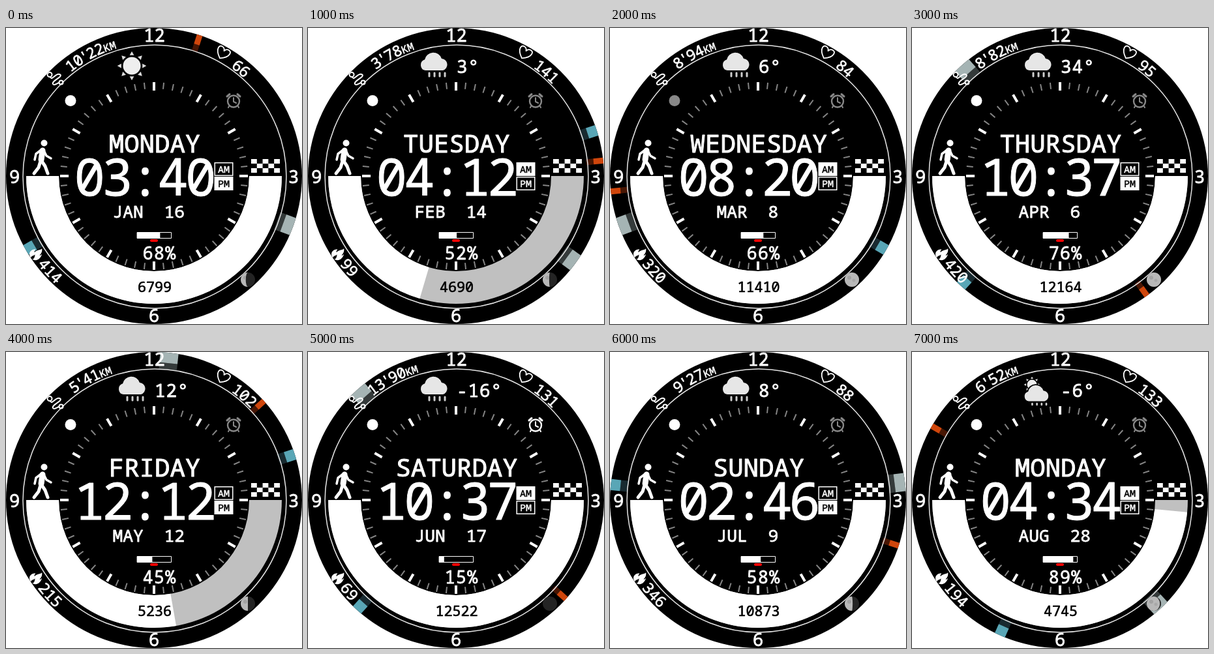
An HTML page with a canvas for the animation above (8 s loop, 454 px wide and 454 px high).

```html
<!DOCTYPE html>
<html lang="en">
<head>
<meta charset="utf-8">
<title>Watch face</title>
<style>
html, body { margin: 0; width: 100%; height: 100%; overflow: hidden; background: #fff; }
canvas { display: block; }
</style>
</head>
<body>
<canvas id="face" width="454" height="454"></canvas>
<script>
const ctx = document.getElementById('face').getContext('2d');
const C = 227, TAU = Math.PI * 2, rad = deg => deg * Math.PI / 180;

// arc: clock angle where the white progress band ends (90 = complete); moon: lit fraction
const states = [
  { day: 'MONDAY', time: '03:40', sec: 3, pm: 1, date: 'JAN  16', power: 68, steps: 6799, km: "10'22", bpm: 66, kcal: 414, temp: '', sky: 'sun', link: 1, moon: .35, arc: 90 },
  { day: 'TUESDAY', time: '04:12', sec: 14, date: 'FEB  14', power: 52, steps: 4690, km: "3'78", bpm: 141, kcal: 99, temp: '3°', sky: 'rain', link: 1, moon: .45, arc: 196.5 },
  { day: 'WEDNESDAY', time: '08:20', sec: 44, date: 'MAR  8', power: 66, steps: 11410, km: "8'94", bpm: 84, kcal: 320, temp: '6°', sky: 'rain', link: 0, moon: 1, arc: 90 },
  { day: 'THURSDAY', time: '10:37', sec: 24, pm: 1, date: 'APR  6', power: 76, steps: 12164, km: "8'82", bpm: 95, kcal: 420, temp: '34°', sky: 'rain', link: 1, moon: 1, arc: 90 },
  { day: 'FRIDAY', time: '12:12', sec: 8, pm: 1, date: 'MAY  12', power: 45, steps: 5236, km: "5'41", bpm: 102, kcal: 215, temp: '12°', sky: 'rain', link: 1, moon: .5, arc: 170 },
  { day: 'SATURDAY', time: '10:37', sec: 22, date: 'JUN  17', power: 15, steps: 12522, km: "13'90", bpm: 131, kcal: 69, temp: '-16°', sky: 'rain', link: 1, alarm: 1, moon: 0, arc: 90 },
  { day: 'SUNDAY', time: '02:46', sec: 18, pm: 1, date: 'JUL  9', power: 58, steps: 10873, km: "9'27", bpm: 88, kcal: 346, temp: '8°', sky: 'rain', link: 1, moon: .55, arc: 90 },
  { day: 'MONDAY', time: '04:34', sec: 50, date: 'AUG  28', power: 89, steps: 4745, km: "6'52", bpm: 133, kcal: 194, temp: '-6°', sky: 'mixed', link: 1, moon: .92, arc: 95.5 },
];

const paths = {
  heart: new Path2D('M0 9C-6 5 -10 1 -10 -4C-10 -10 -2 -10 0 -4C2 -10 10 -10 10 -4C10 1 6 5 0 9Z'),
  flame: new Path2D('M-1 10C-10 9 -10 0 -5 -4C-5 -1 -4 0 -3 0C-3 -6 1 -8 1 -12C6 -8 5 -5 6 -2C7 -3 7 -5 7 -6C11 1 9 9 2 10C4 7 2 5 0 2C0 6 -3 6 -1 10Z'),
  route: new Path2D('M68 75C70 82 76 69 82 71C90 74 69 81 72 86C74 89 78 85 81 84'),
  cloud: new Path2D('M180 65A8.5 8.5 0 0 1 179 48.5A13.5 13.5 0 0 1 205 47A9.2 9.2 0 0 1 207 65Z'),
};

function fill(color, path) { ctx.fillStyle = color; path ? ctx.fill(path) : ctx.fill(); }
function stroke(color, width, path) {
  ctx.strokeStyle = color; ctx.lineWidth = width;
  path ? ctx.stroke(path) : ctx.stroke();
}
function disc(x, y, r, color) { ctx.beginPath(); ctx.arc(x, y, r, 0, TAU); fill(color); }
function ring(x, y, r, color, width) { ctx.beginPath(); ctx.arc(x, y, r, 0, TAU); stroke(color, width); }
function rect(x, y, w, h, color) { ctx.fillStyle = color; ctx.fillRect(x, y, w, h); }
function line(color, width, ...points) {
  ctx.beginPath();
  for (let i = 0; i < points.length; i += 2) ctx.lineTo(points[i], points[i + 1]);
  stroke(color, width);
}
function at(x, y, deg, paint) {
  ctx.save(); ctx.translate(x, y); ctx.rotate(rad(deg)); paint(); ctx.restore();
}
// A thin outline gives the letters a medium weight with rounded ends.
function text(str, x, y, size, { color = '#fff', align = 'center', gap = 0 } = {}) {
  ctx.font = `${size}px "Noto Sans Mono", monospace`;
  ctx.letterSpacing = gap + 'px';
  ctx.textAlign = align;
  ctx.fillStyle = ctx.strokeStyle = color;
  ctx.lineWidth = Math.min(size * .03, 1);
  const left = x + (align === 'center' ? gap / 2 : 0);
  ctx.fillText(str, left, y);
  ctx.strokeText(str, left, y);
}

const advance = (ch, size) => size * (ch === "'" ? .4 : .6);
// Text on a circle; inward letters have their tops towards the centre. Returns the end angle.
function arcText(str, angle, size, inward) {
  const mid = inward ? 216 : 212, r = inward ? 224 : -204, dir = inward ? -1 : 1;
  for (const ch of String(str)) {
    const half = dir * advance(ch, size) / 2 / mid * 360 / TAU;
    at(C, C, angle + half + (inward ? 180 : 0), () => text(ch, 0, r, size));
    angle += 2 * half;
  }
  return angle;
}

function marker(angle, width, edge, bright, dark) {
  at(C, C, angle, () => {
    rect(-width / 2, -edge, width, edge - 201, dark);
    rect(-width / 2, -229, width, 229 - edge, bright);
  });
}

function drawBand(arc) {
  const band = (from, to, color) => {
    ctx.beginPath();
    ctx.arc(C, C, 196, rad(from - 90), rad(to - 90));
    ctx.arc(C, C, 146, rad(to - 90), rad(from - 90), true);
    fill(color);
  };
  band(90, 270, '#c0c0c0');
  band(arc, 270, '#fff');
  for (let i = 0; i < 60; i++) at(C, C, i * 6, () =>
    i % 5 ? line('#858585', 2, 0, -134, 0, -144) : line('#fff', 4, 0, -131, 0, -144));
}

function sun(x, y, r, rays) {
  disc(x, y, r, '#eee');
  for (let i = 0; i < rays; i++) at(x, y, i * 360 / rays, () => {
    ctx.beginPath();
    ctx.moveTo(-r * .25, -r * 1.2); ctx.lineTo(r * .25, -r * 1.2); ctx.lineTo(0, -r * 1.65);
    fill('#ddd');
  });
}

function drawWeather(sky) {
  if (sky === 'sun') return sun(193, 58, 13.5, 8);
  const mixed = sky === 'mixed';
  if (mixed) sun(184, 50, 7.5, 8);
  ctx.save();
  if (mixed) {
    ctx.translate(17, 17);
    ctx.scale(.9, .9);
    stroke('#000', 4, paths.cloud);
  }
  fill('#e6e6e6', paths.cloud);
  for (let x = 186; x < 212; x += 8) line('#ccc', 3, x, 69, x, mixed ? 71 : 74);
  ctx.restore();
}

function drawAlarm(color) {
  ring(349, 112.5, 9, color, 2.4);
  line(color, 2, 349, 107, 349, 113, 353, 115);
  line(color, 3, 339, 105, 343, 101.5);
  line(color, 3, 359, 105, 355, 101.5);
  line(color, 2, 342, 120, 341, 122);
  line(color, 2, 356, 120, 357, 122);
}

function drawWalker() {
  disc(58.5, 176.5, 5, '#fff');
  line('#fff', 9, 56, 188, 54, 202);
  line('#fff', 3.5, 54, 187, 46, 193, 44, 202);
  line('#fff', 3.5, 58, 188, 62, 196, 69, 200);
  line('#fff', 5, 54, 203, 60, 212, 64, 223);
  line('#fff', 5, 53, 204, 50, 214, 43, 223);
}

function drawFlag() {
  for (let row = 0; row < 3; row++)
    for (let col = row % 2; col < 5; col += 2) rect(376 + col * 8.8, 201 + row * 7, 8.8, 7, '#fff');
}

function drawMoon(lit) {
  const x = 371, y = 386, r = 11;
  disc(x, y, r, '#242424');
  if (!lit) return;
  ctx.beginPath();
  ctx.arc(x, y, r, TAU / 4, TAU * 3 / 4);
  ctx.ellipse(x, y, Math.abs(2 * lit - 1) * r, r, 0, -TAU / 4, TAU / 4, lit < .5);
  fill('#b8b8b8');
  ctx.save();
  ctx.clip();
  disc(x - 4, y - 3, 3, '#a2a2a2');
  disc(x + 3, y + 1, 2.5, '#a8a8a8');
  ctx.restore();
}

function drawRim(s) {
  stroke('#fff', 2, paths.route);
  ring(67, 71.5, 3.5, '#fff', 2);
  ring(84.5, 83.5, 3, '#fff', 2);
  const width = [...s.km].reduce((sum, ch) => sum + advance(ch, 23), 2 * advance('K', 16));
  const end = arcText(s.km, -27.6 - width / 2 / 212 * 360 / TAU, 23);
  arcText('KM', end, 16);
  at(332.5, 38.5, 30, () => stroke('#fff', 1.8, paths.heart));
  arcText(s.bpm, 35.3, 23);
  at(46, 346, 45, () => fill('#fff', paths.flame));
  arcText(s.kcal, 233, 23, true);
  drawMoon(s.moon);
  text('12', C + .5, 21, 27);
  text('3', 441, 238, 27);
  text('6', C, 451, 27);
  text('9', 13, 238, 27);
}

function halfDay(label, y, on) {
  rect(319.5, y, 29, 21, '#fff');
  if (!on) rect(321, y + 1.5, 26, 18, '#000');
  text(label, 334, y + 15.5, 15, { color: on ? '#000' : '#fff' });
}

function drawCentre(s) {
  text(s.day, 228, 191, 39);
  text(s.time, 213.5, 256.5, 79, { gap: -4.8 });
  halfDay('AM', 206, !s.pm);
  halfDay('PM', 228, s.pm);
  text(s.date, 163.5, 291, 26.3, { align: 'left' });
  ctx.strokeStyle = '#fff';
  ctx.lineWidth = 1;
  ctx.strokeRect(201.5, 313.5, 52, 9);
  rect(201, 313, 52 * s.power / 100, 10, '#fff');
  line('#f00', 4, 223, 326, 231, 326);
  text(s.power + '%', 235, 355, 26.5, { gap: 1.4 });
  text(s.steps, 228, 405, 21.7, { color: '#000' });
}

function draw(s) {
  ctx.clearRect(0, 0, 454, 454);
  ctx.save();
  ctx.lineCap = 'butt';
  disc(C, C, C, '#000');
  ctx.clip();
  const [h, m] = s.time.split(':').map(Number);
  marker(h % 12 * 30 + m / 2, 28, 211, '#a5b4b4', '#343a3a');
  marker(m * 6, 17, 212, '#59a6b6', '#182a30');
  marker(s.sec * 6, 9, 212, '#cf460c', '#481603');
  ring(228, 228, 202, '#e4e4e4', 1.5);
  drawBand(s.arc);
  ctx.lineCap = ctx.lineJoin = 'round';
  drawRim(s);
  drawWeather(s.sky);
  text(s.temp, 228, 69, 27.5, { align: 'left', gap: 1 });
  disc(99, 111.5, 8.5, s.link ? '#fff' : '#888');
  drawAlarm(s.alarm ? '#fff' : '#888');
  drawWalker();
  drawFlag();
  drawCentre(s);
  ctx.restore();
}

function tick() {
  draw(states[Math.floor(performance.now() / 1000) % states.length]);
  requestAnimationFrame(tick);
}
tick();
</script>
</body>
</html>
```
